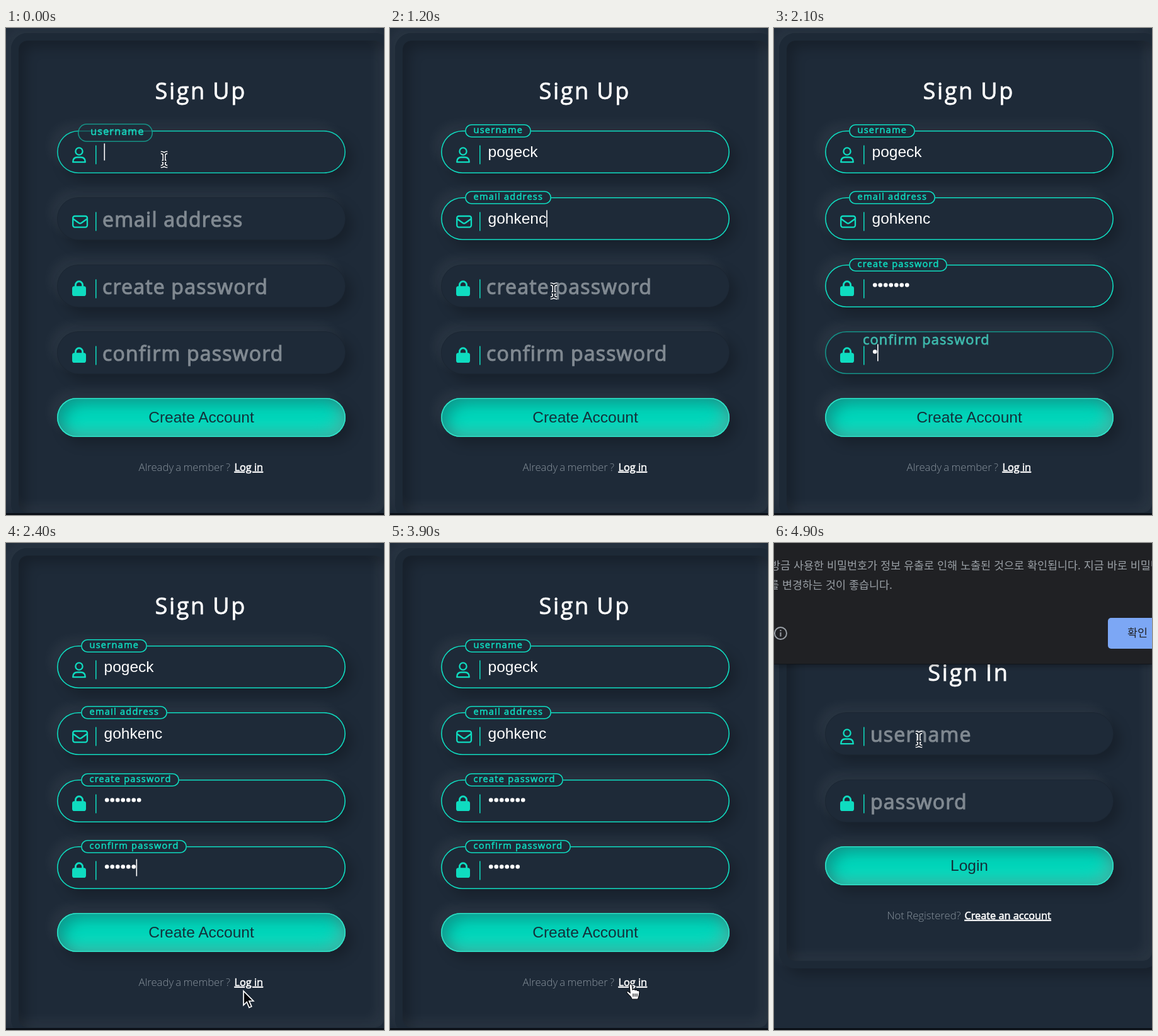
An HTML page that plays this animation: 600x774 px, repeating every 5000 ms.

```html
<!DOCTYPE html>
<html lang="en">
<head>
<meta charset="utf-8">
<title>Sign up form</title>
<style>
  :root {
    --bg: #1e2a38;
    --teal: #0fdcc0;
    --light: rgba(255, 255, 255, .055);
    --dark: rgba(0, 0, 0, .24);
    --raised: -10px -10px 20px var(--light), 10px 10px 20px var(--dark);
  }
  html, body { margin: 0; width: 100%; height: 100%; overflow: hidden; background: var(--bg); }
  #stage { position: absolute; left: 0; top: 0; width: 600px; height: 774px; overflow: hidden; background: var(--bg); }
  #stage div, #stage span, svg { position: absolute; box-sizing: border-box; }
  svg { left: 0; top: 0; }
  .scene { left: 0; top: 0; width: 600px; height: 774px; }
  .panel {
    left: 8px; width: 604px; border: 12px solid #1d2936; border-radius: 26px;
    box-shadow: var(--raised),
      inset 10px 10px 20px var(--dark), inset -10px -10px 20px var(--light);
  }
  .field {
    left: 81px; width: 458px; height: 68px; border-radius: 34px;
    background: var(--bg); box-shadow: var(--raised);
  }
  .button {
    left: 81px; width: 458px; height: 62px; border-radius: 31px;
    background: #00d9bd;
    box-shadow: var(--raised), inset 0 0 0 1.6px #2fe0c6,
      inset 10px 10px 24px rgba(20, 50, 60, .36), inset -10px -10px 24px rgba(110, 165, 155, .5);
  }
  .label {
    white-space: pre;
    font-family: "Open Sans", "Noto Sans", sans-serif; -webkit-text-stroke: .036em;
  }
  text { white-space: pre; }
  .title { font: 36px "Open Sans", "Noto Sans", sans-serif; letter-spacing: 2.65px; word-spacing: -1.5px;
    fill: #fff; stroke: #fff; stroke-width: .8px; }
  .typed, .action { font: 24.5px "Liberation Sans", Arial, sans-serif; fill: #fff; }
  .action { fill: #14303a; text-anchor: middle; }
  .hint { font: 300 16.7px "Open Sans", "Noto Sans", sans-serif; word-spacing: -1px; fill: #87929c; }
  .link { font: 16.3px "Open Sans", "Noto Sans", sans-serif; fill: #fff; stroke: #fff; stroke-width: .6px;
    text-decoration: underline; text-underline-offset: 3px; text-decoration-thickness: 1.3px; }
  .notice text { font: 17.4px "Noto Sans CJK KR", "Noto Sans CJK", sans-serif; word-spacing: 1.1px; fill: #9aa0a6; }
  .notice .ok { fill: #202124; }
  #notice { left: 0; top: 0; width: 600px; height: 193px; background: #202124; border-bottom: 1px solid #10151b;
    box-shadow: 0 3px 8px rgba(0, 0, 0, .3); }
  #edge { left: 0; top: 771px; width: 600px; height: 3px; background: #0b1017; }
</style>
</head>
<body>
<div id="stage"></div>
<script>
const LOOP = 5000, STEP = 100, SIGN_IN_AT = 4100, NOTICE_AT = 4700;
const stage = document.getElementById('stage');

const icons = {
  user: `<g fill="none" stroke="#0fdcc0" stroke-width="2.3">
    <circle cx="116" cy="33" r="5.6"/>
    <path d="M106.2 50.2 Q106.2 42.5 113 42.5 H119 Q125.8 42.5 125.8 50.2 Z" stroke-linejoin="round"/></g>`,
  mail: `<g fill="none" stroke="#0fdcc0" stroke-width="2.3" stroke-linejoin="round">
    <rect x="106.2" y="30" width="22.8" height="17.6" rx="3"/>
    <path d="M106.4 34.2 L115.4 40.8 Q117.6 42.2 119.8 40.8 L128.8 34.2"/></g>`,
  lock: `<rect x="105" y="34.2" width="22" height="15.8" rx="3.6" fill="#0fdcc0"/>
    <path d="M110.4 35 V32.4 A5.6 5.6 0 0 1 121.6 32.4 V35" fill="none" stroke="#0fdcc0" stroke-width="2.9"/>`
};

const signUp = {
  top: 8, height: 774, title: ['Sign Up', 236.5, 113.3],
  button: ['Create Account', 588],
  foot: ['Already a member ?', 210.5, 'Log in', 362.5, 704],
  fields: [
    { name: 'username', icon: 'user', y: 163, focus: -325, typeAt: 0, pace: 80, text: 'pogeck' },
    { name: 'email address', icon: 'mail', y: 269, focus: 600, typeAt: 700, pace: 62, text: 'gohkenc' },
    { name: 'create password', icon: 'lock', y: 376, focus: 1270, typeAt: 1400, pace: 62, dots: 7 },
    { name: 'confirm password', icon: 'lock', y: 482, focus: 1930, typeAt: 2050, pace: 58, dots: 6 }
  ]
};
const signIn = {
  top: 114, height: 562, title: ['Sign In', 244.3, 219.3],
  button: ['Login', 482],
  foot: ['Not Registered?', 179.5, 'Create an account', 302.5, 598],
  fields: [
    { name: 'username', icon: 'user', y: 269, focus: Infinity },
    { name: 'password', icon: 'lock', y: 376, focus: Infinity }
  ]
};

// Pointer stops: time, x, y, shape; a stop without a shape hides it.
const stops = [
  [0, 251, 209, 'beam'], [100], [600, 255, 307, 'beam'], [800],
  [1100, 258, 362, 'beam'], [1200, 260, 418, 'beam'], [1400],
  [1900, 262, 508, 'beam'], [2100], [2300, 345, 645, 'arrow'], [2400, 377, 711, 'arrow'],
  [3600, 375, 700, 'hand'], [4100, 362, 640, 'arrow'], [4200, 300, 465, 'arrow'],
  [4300, 248, 335, 'beam'], [4400, 233, 289, 'beam'], [4500, 231, 302, 'beam'], [4600, 230, 312, 'beam']
];
const beam = 'M-5.2 -11 Q0 -11 0 -7 V7 Q0 11 -5.2 11 M5.2 -11 Q0 -11 0 -7 M5.2 11 Q0 11 0 7 M-3.4 3 H3.4';
const pointers = {
  beam: `<path d="${beam}" fill="none" stroke="#fff" stroke-width="5"/>
    <path d="${beam}" fill="none" stroke="#17202b" stroke-width="2"/>`,
  arrow: `<path d="M0 1 V23.5 L5.2 18.4 L9 27.4 L12.8 25.6 L9 17 H15.8 Z" fill="#05070a" stroke="#fff" stroke-width="1.7"/>`,
  hand: `<path d="M5 3 Q5 1 7 1 Q9 1 9.2 3 L10 10 Q13 8.5 14 10.5 Q17 9.5 17.5 11.5 Q21 11 21 14 L20 20 L18.5 25
    H9 L7.5 21.5 L1.5 15.5 Q0 13 2.2 12.3 L6.2 15 Z" fill="#fff" stroke="#0a0d12" stroke-width="1.2"/>
    <path d="M11 16 V21 M14 16 V21 M17 16 V21" stroke="#0a0d12" stroke-width="1.2"/>`
};

const clamp = (v, lo, hi) => Math.min(hi, Math.max(lo, v));
const mix = (a, b, k) => a + (b - a) * k;
const box = (cls, top, height) => `<div class="${cls}" style="top:${top}px;height:${height}px"></div>`;
const svg = (inner, cls = '') => `<svg class="${cls}" width="600" height="774">${inner}</svg>`;
const text = (cls, s, x, y) => `<text class="${cls}" x="${x}" y="${y}">${s}</text>`;
// Inset shadows keep fractional line widths, unlike borders.
const ring = alpha => `inset 0 0 0 1.6px rgba(15,220,192,${alpha})`;

// CSS "ease" curve, solved by bisection.
function ease(x) {
  if (x <= 0) return 0;
  if (x >= 1) return 1;
  let lo = 0, hi = 1;
  for (let i = 0; i < 24; i++) {
    const u = (lo + hi) / 2, v = 1 - u;
    if (.75 * v * v * u + .75 * v * u * u + u ** 3 < x) lo = u; else hi = u;
  }
  const v = 1 - lo;
  return .3 * v * v * lo + 3 * v * lo * lo + lo ** 3;
}

function build(spec) {
  const el = document.createElement('div');
  const [hint, hintX, link, linkX, footY] = spec.foot;
  const [action, actionY] = spec.button;
  el.className = 'scene';
  el.innerHTML = box('panel', spec.top, spec.height) +
    spec.fields.map(f => box('field', f.y, 68)).join('') +
    box('button', actionY, 62) +
    spec.fields.map(f => `<span class="label">${f.name}</span>`).join('') +
    svg(text('title', ...spec.title) +
      spec.fields.map(f => `<g transform="translate(0 ${f.y})">${icons[f.icon]}
        <rect x="142" y="23.5" width="1.5" height="30" fill="#0fdcc0"/>
        <g class="value">${text('typed', '', 155.5, 42)}</g>
        <rect class="caret" y="20.5" width="1.6" height="27" fill="#fff"/></g>`).join('') +
      text('action', action, 310, actionY + 39) +
      text('hint', hint, hintX, footY) + text('link', link, linkX, footY));
  stage.append(el);
  const all = s => [...el.querySelectorAll(s)];
  const parts = { field: all('.field'), label: all('.label'), value: all('.value'), caret: all('.caret') };
  spec.fields.forEach((f, i) => {
    for (const key in parts) f[key + 'El'] = parts[key][i];
  });
  return el;
}

// rest: 1 = large placeholder, 0 = small label on the border
function placeLabel(f, rest) {
  const height = 21.5 + 85 * rest, padLeft = 13.5 + 75 * rest;
  const shown = clamp(1 - 5 * rest, 0, 1);
  const tone = [mix(15, 128, rest), mix(220, 137, rest), mix(192, 145, rest)].map(Math.round);
  Object.assign(f.labelEl.style, {
    left: 132.5 + 20.5 * rest - padLeft + 'px',
    top: f.y + .5 + 37 * rest - height / 2 + 'px',
    height: height + 'px',
    lineHeight: height - 4 + 'px',
    padding: `0 ${12.5 + 15 * rest}px 0 ${padLeft}px`,
    fontSize: mix(14.5, 32, rest) + 'px',
    letterSpacing: mix(1.27, 1.2, rest) + 'px',
    borderRadius: height / 2 + 'px',
    boxShadow: ring(shown),
    background: `rgba(30,42,56,${shown})`,
    color: `rgb(${tone})`
  });
}

function drawField(f, t, active) {
  const rest = 1 - ease((t - f.focus) / 500);
  placeLabel(f, rest);
  const line = t >= f.focus ? ring(1 - rest) : 'inset 0 0 0 1px rgba(0,0,0,.1)';
  f.fieldEl.style.boxShadow = `var(--raised), ${line}`;

  const total = f.text ? f.text.length : f.dots || 0;
  const count = total ? clamp(Math.ceil((t - f.typeAt) / f.pace), 0, total) : 0;
  let width = 0;
  if (f.text) {
    const node = f.valueEl.firstElementChild;
    node.textContent = f.text.slice(0, count);
    width = count ? node.getComputedTextLength() : 0;
  } else {
    width = count * 8.5;
    f.valueEl.innerHTML = Array.from({ length: count }, (_, i) =>
      `<circle cx="${160.2 + i * 8.5}" cy="32.5" r="3.3" fill="#fff"/>`).join('');
  }
  const blinkOn = t < 2900 || (t - 2400) % 1000 < 500;
  f.caretEl.setAttribute('x', 155.5 + width);
  f.caretEl.style.display = active && blinkOn ? '' : 'none';
}

const upEl = build(signUp), inEl = build(signIn);
stage.insertAdjacentHTML('beforeend', `
  <div id="notice">${svg(
    text('', '방금 사용한 비밀번호가 정보 유출로 인해 노출된 것으로 확인됩니다. 지금 바로 비밀번호', -6, 42) +
    text('', '를 변경하는 것이 좋습니다.', -8, 73) +
    `<circle cx="10.5" cy="143.5" r="9.5" fill="none" stroke="#9aa0a6" stroke-width="1.9"/>
     <path d="M10.5 142 V148.5 M10.5 138 V140.2" stroke="#9aa0a6" stroke-width="2"/>
     <rect x="530" y="119" width="90" height="49" rx="5" fill="#7ca7f5"/>` +
    text('ok', '확인', 561, 149), 'notice')}</div>
  <div id="edge"></div>
  ${svg('<g id="pointer"></g>')}`);
const notice = document.getElementById('notice');
const pointer = document.getElementById('pointer');
signIn.fields.forEach(f => drawField(f, 0, false));

function draw(t) {
  const left = t >= SIGN_IN_AT;
  upEl.style.display = left ? 'none' : '';
  inEl.style.display = left ? '' : 'none';
  notice.style.display = t >= NOTICE_AT ? '' : 'none';
  if (!left) {
    const active = signUp.fields.filter(f => t >= f.focus).pop();
    signUp.fields.forEach(f => drawField(f, t, f === active));
  }
  const [, x, y, shape] = stops.filter(s => s[0] <= t).pop();
  pointer.innerHTML = shape ? pointers[shape] : '';
  if (shape) pointer.setAttribute('transform', `translate(${x} ${y})`);
}

const start = performance.now();
let last = -1;
function tick() {
  const t = Math.floor((performance.now() - start) % LOOP / STEP) * STEP;
  if (t !== last) draw(last = t);
  requestAnimationFrame(tick);
}
tick();
</script>
</body>
</html>
```
